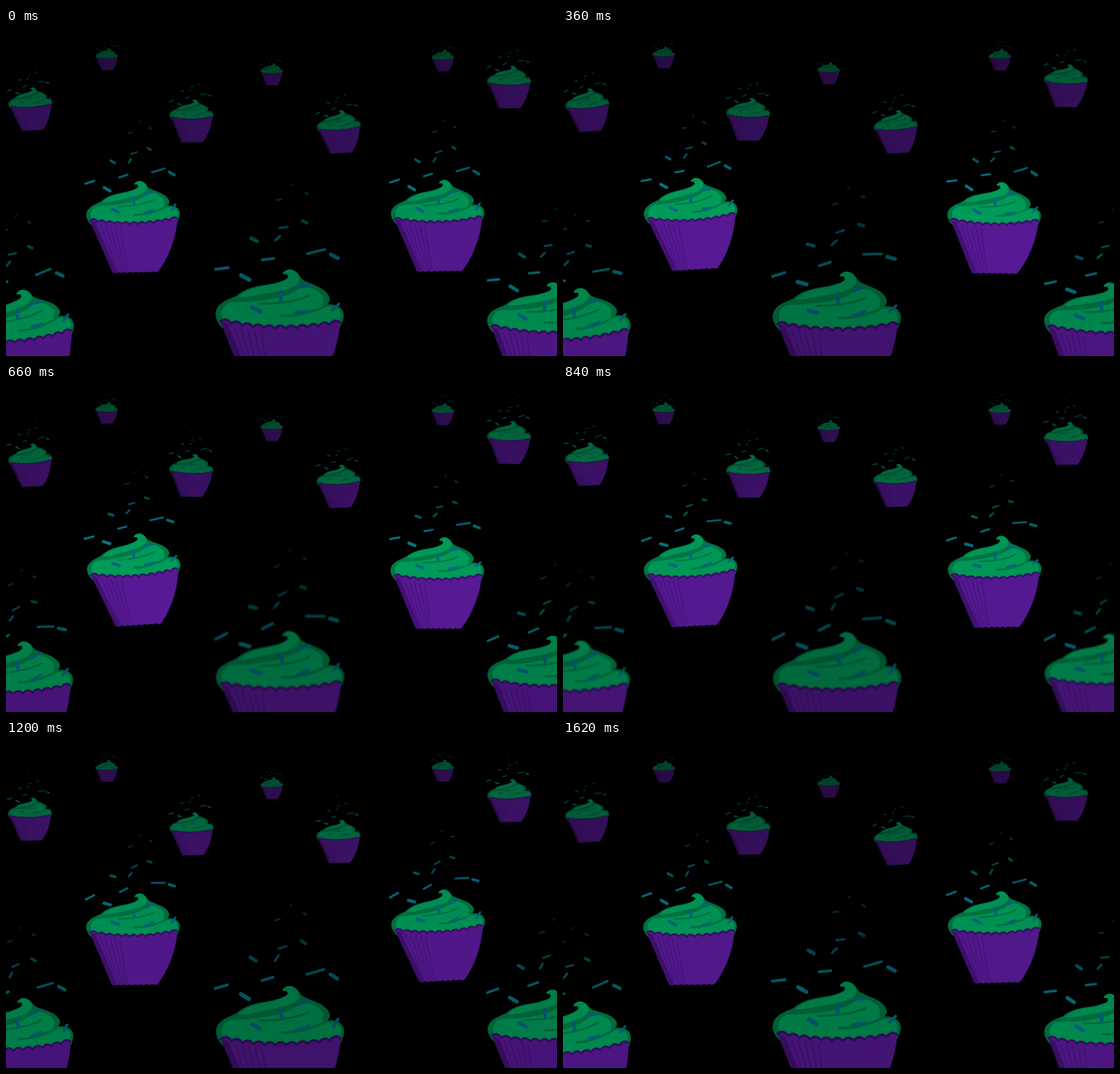
An HTML page for the animation above (1.68 s loop, 900x536 px).

```html
<!DOCTYPE html>
<html lang="en">
<head>
<meta charset="utf-8">
<title>Floating cupcakes</title>
<style>
  html, body { margin: 0; width: 100%; height: 100%; overflow: hidden; background: #000; }
  svg { display: block; width: 900px; height: 536px; }
  line { stroke: #077484; }
  .topping { stroke: #076986; }
</style>
</head>
<body>
<svg id="stage" viewBox="0 0 900 536" fill="none" stroke-linecap="round" stroke-linejoin="round">
  <defs>
    <g id="cake">
      <path fill="#007a45" d="M2.5,-70 C6,-77 18,-78 24.5,-65 C29,-60 45,-57 53,-50 C60,-44 61,-38 56,-34 C70,-35 77,-28 76,-19 C75,-12 72,-8 70,-4 L-68,-4 C-74,-10 -79,-18 -76,-26 C-72,-36 -60,-39 -52,-43 C-40,-54 -25,-55 -10,-58 C2,-61 11,-64 8.5,-68 C7.5,-71 4.5,-68 2.5,-70Z"/>
      <path fill="#009c5a" d="M2.5,-70 C6,-77 18,-78 22.5,-66 C25,-54 4,-50 -13,-47 C-30,-44 -42,-40 -50,-42 C-38,-53 -22,-55 -8,-57 C4,-61 11,-64 8.5,-68 C7.5,-71 4.5,-69 2.5,-70Z"/>
      <path fill="#009c5a" d="M-60,-35 C-30,-36 12,-39 27,-57 C43,-53 50,-47 51,-41 C52,-35 46,-32 56,-31 C68,-33 74,-26 72,-18 L68,-4 L-62,-4 C-72,-17 -73,-29 -60,-35Z"/>
      <path stroke="#007a45" stroke-width="3" d="M2,-20 C20,-19 40,-25 54,-32"/>
      <path stroke="#007a45" stroke-width="2.5" d="M-24,-34 C4,-34 24,-39 34,-44"/>
      <path id="cup" fill="#581a96"/>
      <path fill="#431174" d="M-71,-12 L-62,-9 L-28,73 L-36,74Z"/>
      <path id="pleats" stroke="#441278" stroke-width="1.2"/>
      <path id="rim" stroke="#3b0f68" stroke-width="2.8"/>
    </g>
  </defs>
</svg>
<script>
const LOOP = 1680, STEP = 60, NS = 'http://www.w3.org/2000/svg';
const stage = document.getElementById('stage');
const wave = (t, peak) => Math.cos((t - peak) / LOOP * 2 * Math.PI);
const setPath = (id, d) => document.getElementById(id).setAttribute('d', d);
const make = (tag, attrs, parent) => {
  const el = document.createElementNS(NS, tag);
  for (const k in attrs) el.setAttribute(k, attrs[k]);
  return parent.appendChild(el);
};

// Paper cup: a scalloped rim that sags in the middle, a wavy foot, slanted pleats
const rimY = x => -12.5 + 8 * (1 - (x / 72) ** 2);
let rim = `M-71,${rimY(-71)}`;
for (let x = -58; x <= 72; x += 13) rim += `Q${x - 6.5},${rimY(x - 6.5) - 7} ${x},${rimY(x)}`;
const foot = 'C70,18 56,52 39,73' + 'q-4.6,3 -9.25,0'.repeat(8);
let pleats = '';
for (let x = -54; x < -20; x += 8) pleats += `M${x},${rimY(x) + 4}L${x / 2},72`;
setPath('rim', rim);
setPath('cup', rim + foot + 'Z');
setPath('pleats', pleats);

// Each kind of sprinkle rocks about its angle; spots are relative to the cake
const kinds = [
  { angle: -17, length: 19, width: 3.5, peak: 1600, spots: [[-70, -73], [-15, -84], [3, -122], [-3, -155], [27, -55], [26, -25]] },
  { angle: -9, length: 29, width: 3.5, peak: 570, spots: [[42, -94]] },
  { angle: 24, length: 16, width: 5, peak: 1350, spots: [[-42, -62], [64, -89], [-32, -107], [28, -129], [30, -163], [-29, -27]] },
  { angle: -50, length: 14, width: 3.5, peak: 200, spots: [[-4, -109], [13, -173], [66, -31]] },
  { angle: 86, length: 15, width: 4.4, peak: 0, spots: [[1, -43]] }
];
const sprinkles = kinds.flatMap(({ spots, ...kind }) => spots.map(([x, y]) => {
  const fade = Math.min(1, 1 + (y + 70) / 155);
  const width = kind.width * Math.sqrt(fade);
  return { ...kind, x, y, fade, width, half: (kind.length * fade - width) / 2, flying: y < -60 };
}));

// Layers from back to front; spots are x, y, time of highest point, tilt
const layers = [
  { size: .24, sway: 1, focus: 1000, spots: [[164.5, 49.5, 640, 0], [434, 76.5, 350, 0], [713.5, 51, 860, 0]] },
  { size: .47, sway: 1.6, focus: 1000, spots: [[39, 132, 1180, -3], [303, 151.5, 480, 0], [543, 168, 1020, -2.5], [822, 97, 380, 0]] },
  { size: 1, sway: -1.8, focus: 500, spots: [[207.5, 323.5, 560, -2], [705, 323.5, 1260, -1]] },
  { size: 1.2, sway: 2, focus: 100, spots: [[17, 514.5, 890, -4]] },
  { size: 1.2, sway: -1, focus: 100, spots: [[879, 502, 1040, 1]] },
  { size: 1.37, sway: .7, focus: 0, spots: [[448, 503, 40, 0]] }
];

const cakes = layers.flatMap(({ spots, ...layer }) => spots.map(([x, y, high, tilt]) => {
  const g = make('g', {}, stage);
  make('use', { href: '#cake' }, g);
  const bits = sprinkles.map(s => make('line', {
    class: s.flying ? 'flying' : 'topping',
    x1: -s.half, x2: s.half, 'stroke-width': s.width, opacity: s.fade
  }, g));
  const rise = 2.3 + 1.3 * layer.size ** 3;
  const glow = .95 - .6 * Math.abs(1 - layer.size);
  return { ...layer, x, y, high, tilt, rise, glow, g, bits };
}));

function draw(t) {
  for (const c of cakes) {
    const up = wave(t, c.high), sharp = wave(t, c.focus);
    c.g.setAttribute('transform',
      `translate(${c.x} ${c.y - c.rise * up}) scale(${c.size}) rotate(${c.tilt + c.sway * up} 0 -45)`);
    c.g.style.opacity = c.glow + .05 * sharp;
    c.g.style.filter = `blur(${(.35 * (1 - sharp)).toFixed(3)}px)`;
    sprinkles.forEach((s, i) => {
      const drift = s.flying ? 3.3 * wave(t, c.focus + s.x * 3) : 0;
      const angle = s.angle + 10 * wave(t, c.focus + s.peak);
      c.bits[i].setAttribute('transform', `translate(${s.x} ${s.y - drift}) rotate(${angle})`);
    });
  }
}

const start = performance.now();
let last = -1;
function tick() {
  const t = Math.floor((performance.now() - start) % LOOP / STEP) * STEP;
  if (t !== last) draw(last = t);
  requestAnimationFrame(tick);
}
tick();
</script>
</body>
</html>
```
